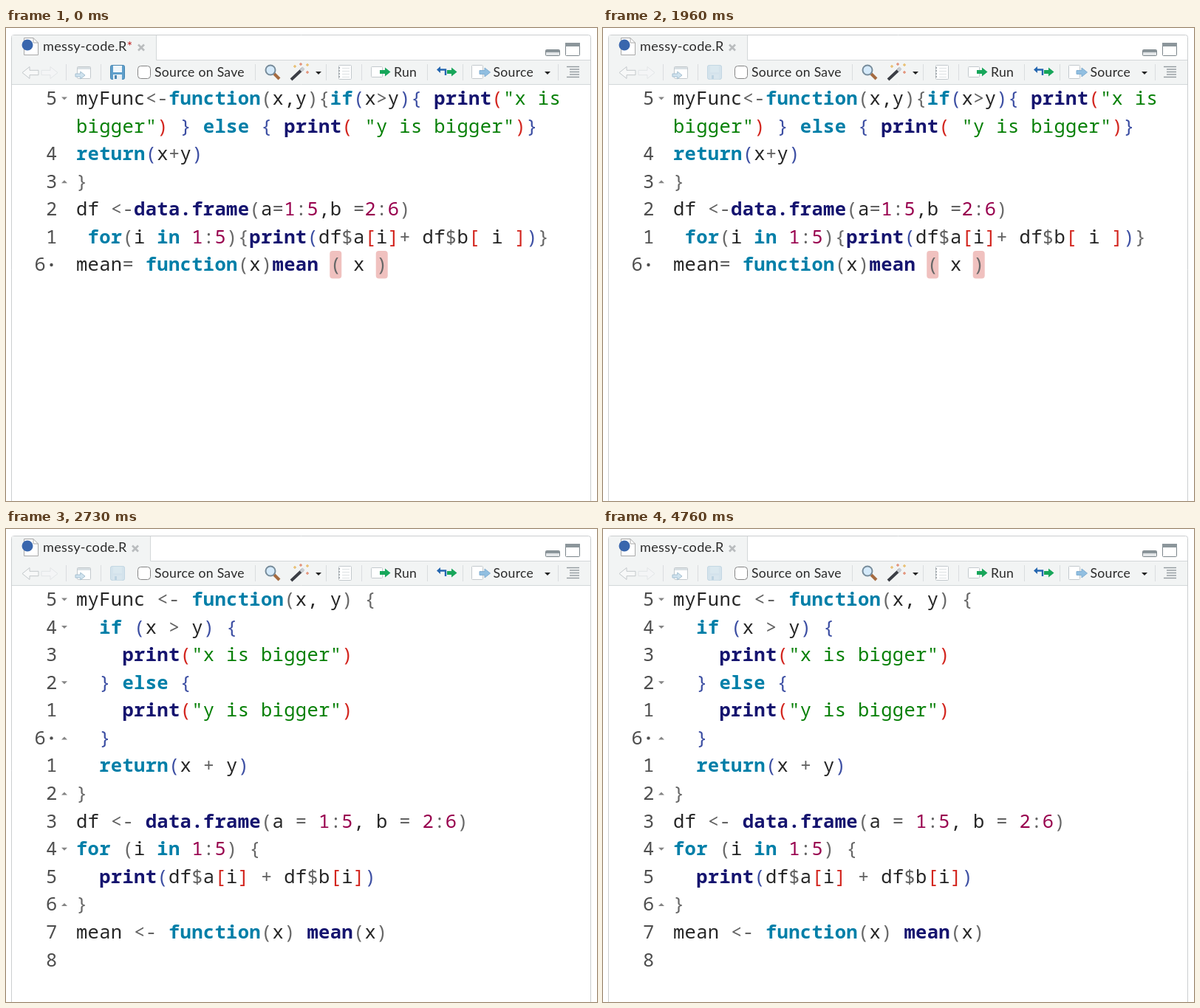
These frames come from a looping animation (800x641 px, 5180 ms). An HTML page with a canvas:

```html
<!DOCTYPE html>
<html lang="en">
<head>
<meta charset="utf-8">
<title>Code styling</title>
<style>
html, body { margin: 0; height: 100%; overflow: hidden; background: #fff }
canvas { display: block }
</style>
</head>
<body>
<canvas id="stage" width="800" height="641"></canvas>
<script>
const ctx = document.getElementById('stage').getContext('2d');
const LOOP = 5180, SAVED = 1610, STYLED = 2030, BLINK = 1050, BLINK_ON = 630;
const LEFT = 95, ADVANCE = 15.62, BASELINE = 104, LINE = 37.58;
const CODE_FONT = '25.5px "Noto Sans Mono", monospace';

const messy = {
  code: `myFunc<-function(x,y){if(x>y){ print("x is
bigger") } else { print( "y is bigger")}
return(x+y)
}
df <-data.frame(a=1:5,b =2:6)
 for(i in 1:5){print(df$a[i]+ df$b[ i ])}
mean= function(x)mean ( x )`,
  gutter: ['5v', '', '4', '3^', '2', '1', '6·'],
  cursor: { row: 6, col: 26, color: '#e36a66' },
  marks: [22, 26]
};
const tidy = {
  code: `myFunc <- function(x, y) {
  if (x > y) {
    print("x is bigger")
  } else {
    print("y is bigger")
  }
  return(x + y)
}
df <- data.frame(a = 1:5, b = 2:6)
for (i in 1:5) {
  print(df$a[i] + df$b[i])
}
mean <- function(x) mean(x)
`,
  gutter: ['5v', '4v', '3', '2v', '1', '6·^', '1', '2^', '3', '4v', '5', '6^', '7', '8'],
  cursor: { row: 5, col: 3, color: '#e98a86' },
  marks: []
};

const TOKEN = /("[^"]*")|\b(function|if|else|return|for|in)\b|(print|data\.frame|mean(?=\s*\())|(\d+)|([([{])|([)\]}])|(\w+|,)|\s+|./g;
const RAINBOW = ['#686868', '#3d4fa3', '#d3261f'];

function tokenize(code) {
  let depth = 0;
  return [...code.matchAll(TOKEN)].map(([text, string, keyword, call, number, open, close, name]) => {
    let color = '#626262';
    if (string) color = '#078007';
    else if (keyword) color = '#007fa8';
    else if (call) color = '#15146f';
    else if (number) color = '#98004e';
    else if (open) color = RAINBOW[depth++ % 3];
    else if (close) color = RAINBOW[--depth % 3];
    else if (name) color = '#262626';
    return { text, color, bold: keyword || call };
  });
}
for (const doc of [messy, tidy]) doc.tokens = tokenize(doc.code);

function rect(x, y, w, h, fill, stroke, radius = 0) {
  ctx.beginPath();
  ctx.roundRect(x, y, w, h, radius);
  paint(fill, stroke);
}
function poly(points, fill, stroke, width) {
  ctx.beginPath();
  for (let i = 0; i < points.length; i += 2) ctx.lineTo(points[i], points[i + 1]);
  if (fill) ctx.closePath();
  paint(fill, stroke, width);
}
function circle(x, y, r, fill, stroke, width) {
  ctx.beginPath();
  ctx.arc(x, y, r, 0, 7);
  paint(fill, stroke, width);
}
function paint(fill, stroke, width = 1) {
  if (fill) { ctx.fillStyle = fill; ctx.fill(); }
  if (stroke) { ctx.strokeStyle = stroke; ctx.lineWidth = width; ctx.stroke(); }
}
function label(text, x, y, size = 17.6, color = '#2b2b2b') {
  ctx.font = `${size}px Lato, sans-serif`;
  ctx.letterSpacing = '0.3px';
  ctx.fillStyle = color;
  ctx.fillText(text, x, y);
  const end = x + ctx.measureText(text).width;
  ctx.letterSpacing = '0px';
  return end;
}
// Block arrow; dir is 1 for right, -1 for left.
function arrow(x, y, length, half, fill, stroke, dir = 1) {
  const neck = x + dir * (length - half * 1.25), shaft = half * 0.4;
  poly([x, y - shaft, neck, y - shaft, neck, y - half, x + dir * length, y,
    neck, y + half, neck, y + shaft, x, y + shaft, x, y - shaft], fill, stroke);
}
function caret(x, y, dir, color, half = 4) {
  poly([x - half, y - dir * half / 2, x + half, y - dir * half / 2, x, y + dir * half / 2], color);
}
function page(x, y, w, h) {
  rect(x, y, w, h, '#fff', '#c3c9cd', 1);
}

function drawTabs(saved) {
  rect(7.5, 9.5, 784, 660, '#fff', '#cbced0', 3);
  const right = saved ? 195.5 : 203.5;
  rect(8, 10, right - 8, 34, '#f2f4f4');
  rect(8, 43, 783, 33, '#f2f4f4');
  poly([right, 10, right, 43.5, 791, 43.5], null, '#d3d7d9');
  poly([8, 76.5, 791, 76.5], null, '#d3d7d9');

  poly([24.5, 13.5, 37, 13.5, 43.5, 20, 43.5, 36.5, 24.5, 36.5], '#fff', '#a9a9a9');
  poly([37, 13.5, 37, 20, 43.5, 20], null, '#a9a9a9');
  circle(29, 23, 7.5, '#3966ad');
  const end = label('messy-code.R', 50, 31, 18.1);
  if (!saved) label('*', end, 31, 18.1, '#c02222');
  const x = saved ? 175 : 183;
  poly([x - 4, 22.5, x + 4, 30.5], null, '#b9bcbe', 2.6);
  poly([x + 4, 22.5, x - 4, 30.5], null, '#b9bcbe', 2.6);

  rect(730.5, 29.5, 19, 8, '#e4e7e9', '#7c868b', 1);
  rect(731, 30, 18, 3, '#8c969b');
  rect(757.5, 20.5, 19, 17, '#fff', '#7c868b', 1);
  rect(757, 20, 20, 5, '#8c969b');
}

function drawToolbar(saved) {
  arrow(44, 60.5, 22, 8, '#f7f8f8', '#c3c8cb', -1);
  arrow(48, 60.5, 22, 8, '#f4f5f6', '#e2e5e7');
  for (const x of [81, 128, 337, 433, 481, 570, 618, 747]) {
    poly([x + .5, 49, x + .5, 71], null, '#dadddf');
  }

  page(96.5, 52.5, 18, 16);
  rect(97, 53, 17, 3, '#d8dfe3');
  arrow(94, 64, 13, 5, '#cfe2ee', '#a5c0d1');

  ctx.globalAlpha = saved ? .2 : 1;
  rect(141.5, 50.5, 19, 19, '#5f9fcb', '#4585b0', 2);
  rect(145, 51, 12, 9, '#f1f7fb');
  rect(145, 63, 12, 7, '#e8f0f5');
  rect(147, 64, 3, 5, '#4d87b0');
  ctx.globalAlpha = 1;

  rect(178.5, 51.5, 17, 17, '#fff', '#858585', 4);
  label('Source on Save', 201, 66);

  poly([363, 62, 370, 69], null, '#a56b40', 4);
  circle(358, 57, 6.5, '#d5eafa', '#778c9b', 2);

  poly([386, 70, 402, 55], null, '#3b3e45', 4);
  poly([399, 58, 403, 54], null, '#c9cdd1', 4);
  for (const [x, y, color] of [[391, 52, '#e9bd6c'], [399, 49, '#e38f75'], [408, 50, '#e9bd6c'], [408, 60, '#e38f75']]) {
    poly([x - 2, y, x + 2, y], null, color, 1.4);
    poly([x, y - 2, x, y + 2], null, color, 1.4);
  }
  caret(423, 61, 1, '#222');

  page(450.5, 50.5, 17, 19);
  for (let y = 54; y < 69; y += 4) {
    poly([455, y + .5, 465, y + .5], null, '#dde1e3');
    circle(451, y, 1.2, '#a6adb1');
  }

  page(494.5, 52.5, 15, 14);
  arrow(506, 59.5, 14.5, 6, '#17a65a');
  label('Run', 525, 66);

  poly([595, 64, 595, 56.5, 587, 56.5], null, '#2466b0', 2.4);
  poly([583, 56.5, 588, 52, 588, 61], '#2466b0');
  arrow(597, 59.5, 13.5, 6, '#17a65a');

  page(630.5, 50.5, 15, 18);
  arrow(641, 60, 14.5, 6, '#91bfe1', '#7fadd1');
  label('Source', 659.5, 66);
  caret(733, 61, 1, '#222');

  for (let i = 0; i < 5; i++) {
    poly([i % 4 ? 763 : 759, 52.5 + i * 3.5, 776, 52.5 + i * 3.5], null, '#929a9f', 1.4);
  }
}

function cell(row, col, color, radius) {
  rect(LEFT - .4 + col * ADVANCE, BASELINE - 27.5 + row * LINE, 16, LINE, color, null, radius);
}

function drawCode(doc, cursorOn) {
  for (const col of doc.marks) cell(6, col, '#f0c1bf', 4);
  if (cursorOn) cell(doc.cursor.row, doc.cursor.col, doc.cursor.color);

  let row = 0, col = 0;
  for (const { text, color, bold } of doc.tokens) {
    ctx.font = (bold ? 'bold ' : '') + CODE_FONT;
    ctx.fillStyle = color;
    for (const char of text) {
      if (char === '\n') { row++; col = 0; continue; }
      ctx.fillText(char, LEFT + col++ * ADVANCE, BASELINE + row * LINE);
    }
  }

  ctx.font = CODE_FONT;
  doc.gutter.forEach((mark, i) => {
    const y = BASELINE + i * LINE, current = mark.includes('·');
    ctx.fillStyle = '#4e4e4e';
    ctx.fillText(mark.slice(0, 1), current ? 38.4 : 54, y);
    if (current) circle(61.5, y - 8.5, 2.2, '#4e4e4e');
    if (/[v^]/.test(mark)) caret(79, y - 8.5, mark.endsWith('v') ? 1 : -1, '#858585');
  });
}

function draw(now) {
  const t = now % LOOP;
  const styled = t >= STYLED, saved = t >= SAVED;
  // The blink restarts when the styled code puts the cursor in a new place.
  const phase = styled ? t - STYLED : t - 210;
  const cursorOn = phase >= 0 && phase % BLINK < BLINK_ON;
  ctx.fillStyle = '#fff';
  ctx.fillRect(0, 0, 800, 641);
  drawTabs(saved);
  drawToolbar(saved);
  drawCode(styled ? tidy : messy, cursorOn);
  requestAnimationFrame(draw);
}
requestAnimationFrame(draw);
</script>
</body>
</html>
```
